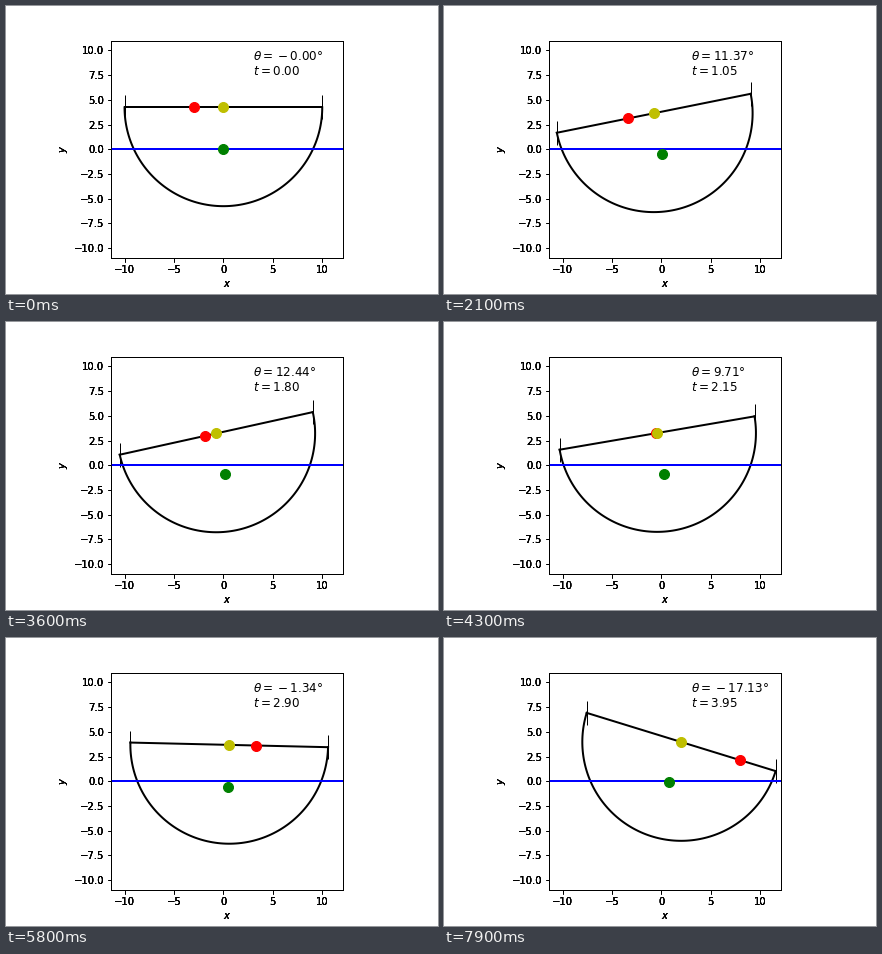
Write a matplotlib script that moves like this. It is 432 px wide and 288 px high and loops after 8000 ms.

```python
import numpy as np
import matplotlib.pyplot as plt
from matplotlib.animation import FuncAnimation

FRAMES, INTERVAL, DT = 80, 100, 0.05
R, G = 10.0, 9.81
H = 4 * R / (3 * np.pi)  # deck centre above the hull's centre of mass
W_PX, H_PX, DPI = 432, 288, 72

plt.rcParams["font.family"] = "DejaVu Sans"


def spline(knots, values, curve0, curve1):
    """Cubic spline with given second derivatives at both ends."""
    x, y = np.array(knots), np.array(values)
    h, n = np.diff(x), len(x)
    slope = np.diff(y) / h
    a, b = np.eye(n), np.zeros(n)
    b[0], b[-1] = curve0, curve1
    for i in range(1, n - 1):
        a[i, i - 1:i + 2] = h[i - 1], 2 * (h[i - 1] + h[i]), h[i]
        b[i] = 6 * (slope[i] - slope[i - 1])
    m = np.linalg.solve(a, b)

    def at(t):
        i = np.clip(np.searchsorted(x, t) - 1, 0, n - 2)
        u, v = x[i + 1] - t, t - x[i]
        return ((m[i] * u**3 + m[i + 1] * v**3) / (6 * h[i])
                + (y[i] / h[i] - m[i] * h[i] / 6) * u
                + (y[i + 1] / h[i] - m[i + 1] * h[i] / 6) * v)

    return at


# Roll (degrees), sway and heave of the hull
KNOTS = [0, 0.65, 1.45, 2.15, 2.9, 3.5, 3.95]
roll = spline(KNOTS, [0, 7.65, 13.12, 9.71, -1.34, -11.34, -17.13], 5.5, 12.9)
sway = spline(KNOTS, [0, 0.03, 0.12, 0.28, 0.49, 0.67, 0.75], 0, -0.2)
heave = spline(KNOTS, [0, -0.23, -0.79, -0.92, -0.56, -0.22, -0.08], -1, -0.3)

# The load slides along the deck, driven by g sin(theta)
SUB = 20
times = np.arange(FRAMES * SUB) * DT / SUB
force = G * np.sin(np.radians(roll(times)))


def integrate(f):
    steps = (f[1:] + f[:-1]) / 2 * DT / SUB
    return np.concatenate([[0], np.cumsum(steps)])


load_pos = (-3 + integrate(integrate(force)))[::SUB]

fig = plt.figure(figsize=(W_PX / DPI, H_PX / DPI), dpi=DPI, facecolor="white")
box = [105.4 / W_PX, 0.125, 232 / W_PX, 0.755]

# Stacked axes give the heavy, overprinted labels
for layer in range(4):
    ax = fig.add_axes(box, label=f"layer{layer}")
    ax.patch.set_visible(layer == 0)
    ax.set_xlim(-11.33, 12.14)
    ax.set_ylim(-11, 11)
    ax.set_xticks(np.arange(-10, 11, 5))
    ax.set_yticks(np.arange(-10, 10.1, 2.5))
    ax.set_xlabel("$x$")
    ax.set_ylabel("$y$")

arc, = ax.plot([], [], "k", lw=2)
deck, = ax.plot([], [], "k", lw=2)
posts, = ax.plot([], [], "k|", ms=24, mew=1)
ax.axhline(0, color="b", lw=2)
load, = ax.plot([], [], "ro", ms=10)
middle, = ax.plot([], [], "yo", ms=10)
mass, = ax.plot([], [], "go", ms=10)
angle_text = ax.text(3, 9, "", fontsize=12)
time_text = ax.text(3, 7.5, "", fontsize=12)

phi = np.linspace(np.pi, 2 * np.pi, 120)


def update(i):
    t = i * DT
    deg = float(roll(t)) + 0.0
    th = np.radians(deg)
    along = np.array([np.cos(th), np.sin(th)])
    up = np.array([-np.sin(th), np.cos(th)])
    cm = np.array([sway(t), heave(t)])
    top = cm + H * up

    arc.set_data(top[0] + R * np.cos(phi + th), top[1] + R * np.sin(phi + th))
    ends = np.array([top - R * along, top + R * along]).T
    deck.set_data(*ends)
    posts.set_data(*ends)
    for dot, p in ((load, top + load_pos[i] * along), (middle, top), (mass, cm)):
        dot.set_data([p[0]], [p[1]])

    angle_text.set_text(rf"$\theta = {deg:.2f}\degree$")
    time_text.set_text(f"$t = {t:.2f}$")
    return arc, deck, posts, load, middle, mass, angle_text, time_text


anim = FuncAnimation(fig, update, frames=FRAMES, interval=INTERVAL, repeat=True)
plt.show()
```
